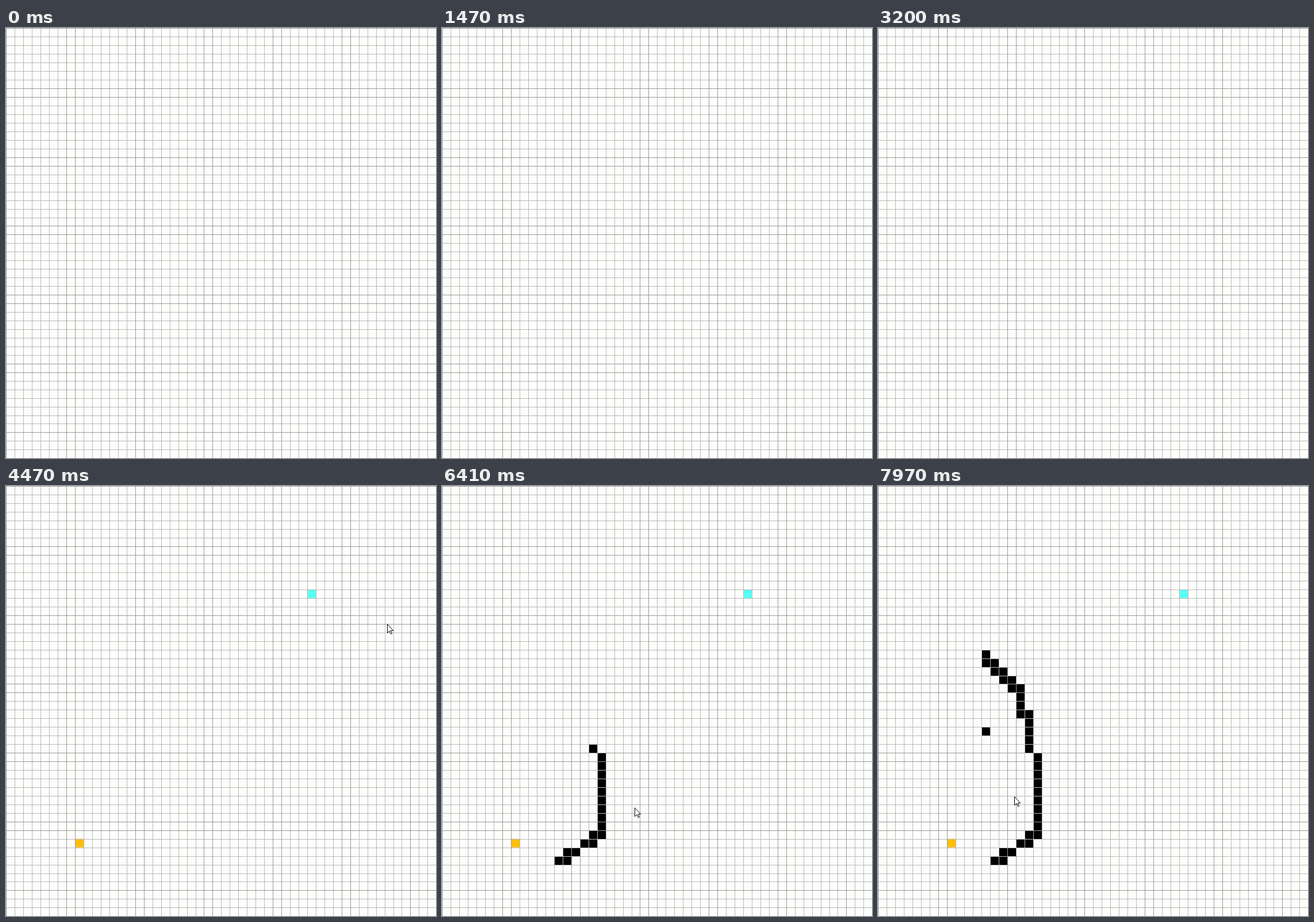
An HTML page without scripts that plays this animation: 748x748 px, repeating every 8000 ms.

```html
<!DOCTYPE html>
<html lang="en">
<head>
<meta charset="utf-8">
<title>Grid drawing</title>
<style>
  html, body { margin: 0; height: 100%; overflow: hidden; background: #fdfdfc; }
  svg { display: block; width: 100%; height: 100%; }

  .cells, .grid { shape-rendering: crispEdges; }
  .grid { fill: none; stroke-width: 748; }
  .fine { stroke: #b8b8b7; stroke-dasharray: 1 13.956; }
  .strong { stroke: #999996; stroke-dasharray: 1 13.956 1 103.692; }

  .start, .goal, .dot, .reveal, .cursor { animation: 8s linear infinite; }
  .start { fill: #ffbf08; animation-name: start; }
  .goal { fill: #55fff6; animation-name: goal; }
  .dot { animation-name: dot; }
  .reveal { animation-name: reveal; }
  .cursor { fill: #fff; stroke: #000; animation-name: cursor; }

  @keyframes start { 0%, 45.4% { opacity: 0 } 45.41%, 100% { opacity: 1 } }
  @keyframes goal { 0%, 53% { opacity: 0 } 53.01%, 100% { opacity: 1 } }
  @keyframes dot { 0%, 98.5% { opacity: 0 } 98.51%, 100% { opacity: 1 } }

  /* the wall grows upwards one row at a time */
  @keyframes reveal {
    0% { transform: translateY(0) }
    67.5% { transform: translateY(0); animation-timing-function: steps(14) }
    80% { transform: translateY(-14px); animation-timing-function: steps(11) }
    91%, 100% { transform: translateY(-25px) }
  }

  @keyframes cursor {
    0%, 45.5% { transform: translate(159px, 777px); animation-timing-function: ease-in-out }
    52.5%, 56.3% { transform: translate(663px, 240px); animation-timing-function: ease-in-out }
    63.5% { transform: translate(300px, 830px) }
    67.5% { transform: translate(253px, 813px) }
    71% { transform: translate(346px, 752px) }
    78.5% { transform: translate(344px, 582px) }
    80.1% { transform: translate(335px, 560px) }
    84% { transform: translate(322px, 490px) }
    87% { transform: translate(304px, 435px) }
    91%, 92% { transform: translate(237px, 362px); animation-timing-function: ease-in-out }
    98%, 100% { transform: translate(237px, 540px) }
  }
</style>
</head>
<body>
<svg viewBox="0 0 748 748">
  <defs>
    <clipPath id="drawn">
      <rect class="reveal" y="44" width="50" height="26"/>
    </clipPath>
  </defs>

  <!-- one unit is one cell -->
  <g class="cells" transform="translate(.49 .49) scale(14.956)">
    <rect class="start" x="8" y="41" width="1" height="1"/>
    <rect class="goal" x="35" y="12" width="1" height="1"/>
    <path clip-path="url(#drawn)" d="M13 43h2v1h-2zM14 42h2v1h-2zM16 41h2v1h-2zM17 40h2v1h-2z
      M18 31h1v9h-1zM17 26h1v5h-1zM16 23h1v4h-1z
      M15 22h1v2h-1zM14 21h1v2h-1zM13 20h1v2h-1zM12 19h1v2h-1z"/>
    <rect class="dot" x="12" y="28" width="1" height="1"/>
  </g>

  <!-- each wide dashed stroke makes a whole set of lines -->
  <path class="grid fine" d="M.49 374H748M374 .49V748"/>
  <path class="grid strong" d="M-14.466 374H715M374-14.466V715"/>

  <path class="cursor" d="M.5.5v15l3.5-3.2 2.4 5.2 2.1-1-2.4-5h4.6z"/>
</svg>
</body>
</html>
```
